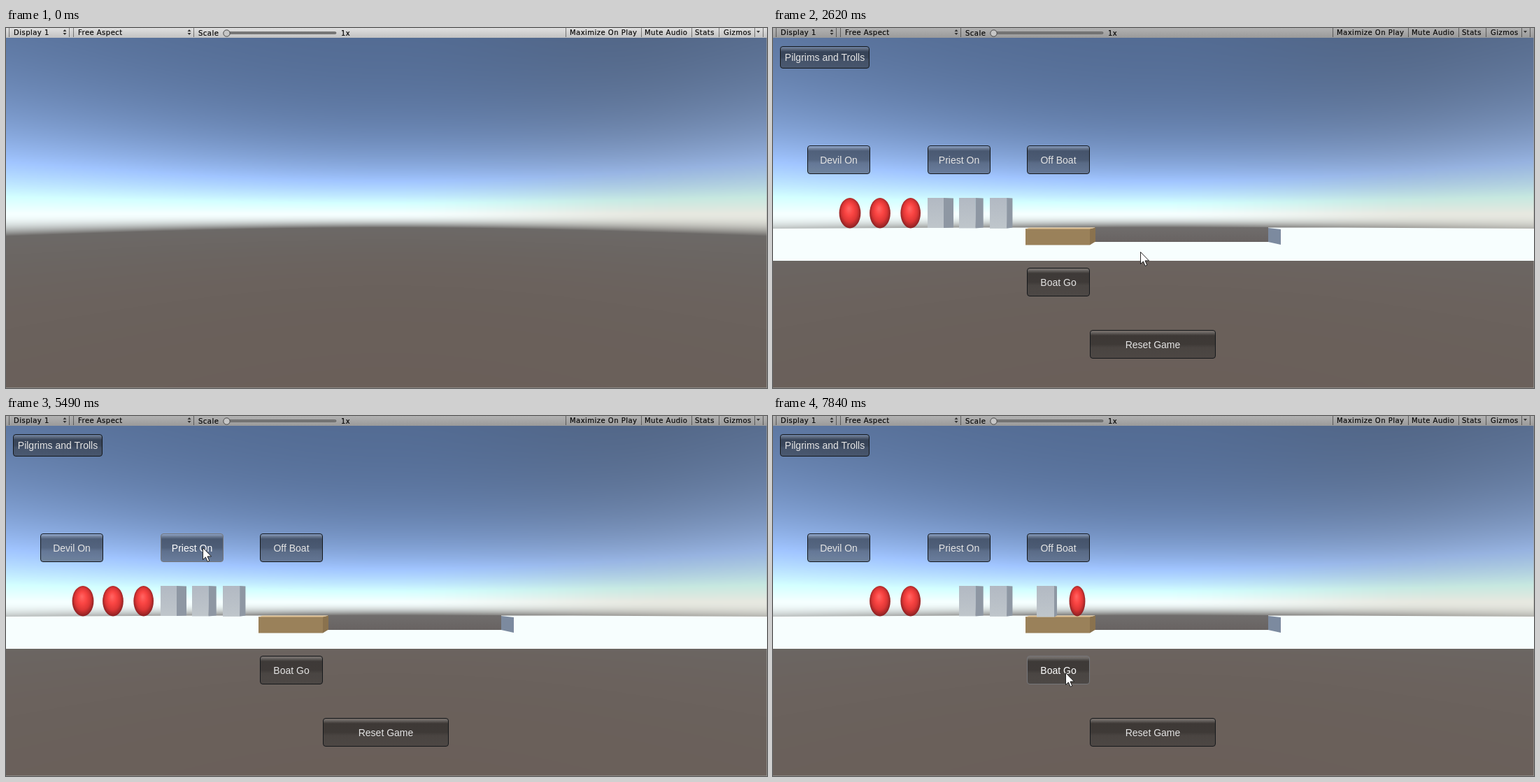
An HTML page with a canvas that plays this animation: 1088 by 515 pixels, repeating every 8000 ms.

```html
<!DOCTYPE html>
<html lang="en">
<head>
<meta charset="utf-8">
<title>River crossing game</title>
<style>
  html, body { margin: 0; width: 100%; height: 100%; overflow: hidden; background: #6a605a; }
  #stage { position: relative; width: 1088px; height: 515px; overflow: hidden; }
  #stage > * { position: absolute; }
  canvas, #bar { left: 0; top: 0; }
  #bar text {
    font: 10px "DejaVu Sans", sans-serif; letter-spacing: .48px;
    fill: #080808; stroke: #080808; stroke-width: .2px;
  }
  .btn {
    box-sizing: border-box; border: 1px solid #15181b; border-radius: 4px;
    display: flex; align-items: center; justify-content: center;
    font: 14px "Liberation Sans", Arial, sans-serif; color: #e4e4e4; white-space: nowrap;
    background: linear-gradient(rgba(255,255,255,.05), rgba(120,120,120,.5) 2px,
      rgba(75,75,75,.5) 4px, rgba(20,20,20,.52) 7px, rgba(22,22,22,.52) 50%,
      rgba(38,38,38,.48) 62%, rgba(42,42,42,.46));
  }
  .btn.hover { border-color: #76777a; color: #fff; }
  #cursor { left: 0; top: 0; overflow: visible; }
</style>
</head>
<body>
<div id="stage">
  <canvas id="view" width="1088" height="515"></canvas>
  <svg id="bar" width="1088" height="15">
    <defs>
      <linearGradient id="light" x2="0" y2="1"><stop stop-color="#e0e0e0"/><stop offset="1" stop-color="#c2c2c2"/></linearGradient>
      <linearGradient id="dark" x2="0" y2="1"><stop stop-color="#b2b2b2"/><stop offset="1" stop-color="#9a9a9a"/></linearGradient>
    </defs>
    <rect id="strip" width="1088" height="14"/>
    <path d="M4.500 0v13m86-13v13m6-13v13m172-13v13m532-13v13m108-13v13m72-13v13m39-13v13m51-13v13m12-13v13" stroke="#000" stroke-opacity=".45"/>
    <path d="M81.500 5l2.500-3 2.500 3zm0 2l2.500 3 2.500-3zM259.500 5l2.500-3 2.500 3zm0 2l2.500 3 2.500-3zM1073 4h5l-2.500 3z" fill="#333"/>
    <rect x="318" y="5.500" width="154" height="3" rx="1.500" fill="#777" stroke="#555" stroke-width=".6"/>
    <circle cx="315.500" cy="7.500" r="4.700" fill="#c6c6c6" stroke="#444"/>
    <text x="11" y="10">Display 1</text>
    <text x="103" y="10">Free Aspect</text>
    <text x="275" y="11">Scale</text>
    <text x="479" y="11">1x</text>
    <text x="806" y="10">Maximize On Play</text>
    <text x="913" y="10">Mute Audio</text>
    <text x="985" y="10">Stats</text>
    <text x="1026" y="10">Gizmos</text>
  </svg>
  <svg id="cursor" width="14" height="22">
    <path d="M.5.5V17.500L4.400 13.900 7.200 20.300 9.800 19.200 7 12.900H12.500Z" fill="#fff" stroke="#111" stroke-width=".9"/>
  </svg>
</div>
<script>
const W = 1088, H = 515, HORIZON = 264.5, FOCAL = 433, LOOP = 8000;
const $ = id => document.getElementById(id);
const ctx = $('view').getContext('2d');
const clamp = v => Math.min(1, Math.max(0, v));
const smooth = k => k * k * (3 - 2 * k);
const mix = (a, b, k) => a + (b - a) * k;

// Sky brightens exponentially towards the horizon, then fades into the ground
const ZENITH = [80, 104, 143], GLOW = [165, 190, 230];
const GROUND = [106, 95, 89], RIM = [2, 10, 14], HAZE = [.06, .09, .12];

function skyColor(x, y, channel) {
  const d = (y - HORIZON) / Math.hypot(1, (x - W / 2) / FOCAL);
  const glow = Math.exp(Math.min(0, d) / 64);
  const haze = HAZE[channel] * smooth(clamp((x - 540) / 420));
  const air = Math.min(255, ZENITH[channel] + GLOW[channel] * glow) * (1 - haze);
  const soil = GROUND[channel] + RIM[channel] * Math.exp(-Math.max(0, d - 20) / 60);
  return mix(air, soil, clamp(d / 20.5) ** 2.2);
}

function paintSky() {
  const cv = document.createElement('canvas');
  cv.width = W; cv.height = H;
  const c = cv.getContext('2d'), img = c.createImageData(W, H);
  for (let i = 0; i < W * H; i++) {
    for (let ch = 0; ch < 3; ch++) img.data[i * 4 + ch] = skyColor(i % W, Math.floor(i / W), ch);
    img.data[i * 4 + 3] = 255;
  }
  c.putImageData(img, 0, 0);
  c.fillStyle = 'rgba(170,170,165,.5)';
  c.fillRect(0, H - 1, W, 1);
  c.fillRect(W - 1, 14, 1, H);
  return cv;
}
const sky = paintSky();

function poly(color, ...p) {
  ctx.fillStyle = color;
  ctx.beginPath();
  for (let i = 0; i < p.length; i += 2) ctx.lineTo(p[i], p[i + 1]);
  ctx.fill();
}

function shade(x, y, w, h, top, bottom) {
  const g = ctx.createLinearGradient(0, y, 0, y + h);
  g.addColorStop(0, top);
  g.addColorStop(1, bottom);
  ctx.fillStyle = g;
  ctx.fillRect(x, y, w, h);
}

function drawRiver() {
  poly('#f7fefe', 0, 287, 280, 285.5, 808, 285.5, W, 287, W, 333, 0, 333);
  shade(460, 285, 248, 21, '#706d6c', '#686362');
  poly('#7c8a9f', 708, 286, 726, 288, 726, 310, 708, 306);
  poly('#9a815a', 361, 287, 453, 287, 453, 310.5, 361, 310.5);
  poly('#8a724e', 453, 287, 461, 285.5, 461, 305.5, 453, 310.5);
  poly('#e0c194', 361, 287.5, 367, 285.5, 461, 285.5, 453, 287.5);
}

function drawDevil(x) {
  ctx.save();
  ctx.translate(x, 264.7);
  ctx.scale(15.4 - (x - 110) * .0122, 21.7);
  const g = ctx.createRadialGradient(-.1, -.3, .05, 0, -.05, 1.05);
  ['#ff6260', '#fb4644', '#dd3635', '#8a2022'].forEach((c, i) => g.addColorStop(i / 3, c));
  ctx.fillStyle = g;
  ctx.beginPath();
  ctx.arc(0, 0, 1, 0, 7);
  ctx.fill();
  ctx.restore();
}

// The side face narrows as the block nears the middle of the view
function drawPriest(x) {
  const k = (x - 221) / 156, mid = x + 23 + 2 * k, end = mid + 14 - 10 * k, base = 286 + 1.5 * k;
  shade(x, 243, mid - x, base - 243, '#b2b9c3', '#bfc6cb');
  poly('#8e97a3', mid, 243, end, 243.5, end, 285.5, mid, base);
}

function addButton(label, x, y, w, h, action) {
  const el = document.createElement('div');
  el.className = 'btn';
  el.textContent = label;
  el.style.cssText = `left:${x}px;top:${y}px;width:${w}px;height:${h}px`;
  $('stage').insertBefore(el, $('cursor'));
  return { el, x, y, w, h, action };
}
const buttons = [
  addButton('Pilgrims and Trolls', 10, 26, 128, 32),
  addButton('Reset Game', 453, 432, 180, 41),
  addButton('Devil On', 49, 168, 90, 41, true),
  addButton('Priest On', 221, 168, 90, 41, true),
  addButton('Off Boat', 363, 168, 90, 41, true),
  addButton('Boat Go', 363, 343, 90, 41, true)
];

const STEP = 78;
const BURSTS = [0, 130, 1610, 2450, 3310, 3460, 3690, 4550, 5410, 5810, 6650, 7520];
function snap(t) {
  const start = BURSTS.filter(b => b <= t).pop();
  return start + Math.floor((t - start + 10) / STEP) * STEP;
}

// Pointer stops: time, x, y
const STOPS = [
  [130, 973, 404], [208, 920, 135],
  [1610, 766, 67], [2000, 492, 195], [2380, 525, 320], [3388, 525, 320],
  [3538, 463, 365], [3768, 435, 339], [4470, 528, 449], [5332, 272, 193],
  [5488, 281, 188], [6050, 281, 190], [6356, 205, 206], [6650, 104, 188],
  [6962, 104, 188], [7274, 470, 390], [7832, 418, 367]
];
function pointer(t) {
  if (t < 130 || (t > 208 && t < 1610)) return null;
  const i = STOPS.findIndex(s => s[0] >= t);
  if (i < 1) return STOPS.at(i).slice(1);
  const [t0, x0, y0] = STOPS[i - 1], [t1, x1, y1] = STOPS[i];
  const k = smooth((t - t0) / (t1 - t0));
  return [Math.round(mix(x0, x1, k)), Math.round(mix(y0, y1, k))];
}

const SPEED = .47, PLAY = 1210, SCENE = 2606, PRIEST_GO = 5805, DEVIL_GO = 6951;
const travel = (t, start, from, to) => Math.min(to, from + Math.max(0, t - start) * SPEED);

function frame(now) {
  const time = now % LOOP, t = snap(time);
  const running = t >= SCENE;
  const priest = travel(t, PRIEST_GO, 221, 377);
  const devil = travel(t, DEVIL_GO, 110, 435);
  const moving = (priest > 221 && priest < 377) || (devil > 110 && devil < 435);
  const pos = pointer(t);

  ctx.drawImage(sky, 0, 0);
  if (running) {
    drawRiver();
    [devil, 153, 196.7].forEach(drawDevil);
    [priest, 266, 310].sort((a, b) => a - b).forEach(drawPriest);
  }

  $('strip').setAttribute('fill', time < PLAY ? 'url(#light)' : 'url(#dark)');
  for (const b of buttons) {
    b.el.style.display = running && !(b.action && moving) ? 'flex' : 'none';
    const over = pos && pos[0] >= b.x && pos[0] < b.x + b.w && pos[1] >= b.y && pos[1] < b.y + b.h;
    b.el.classList.toggle('hover', !!over);
  }
  $('cursor').style.display = pos ? 'block' : 'none';
  if (pos) $('cursor').style.transform = `translate(${pos[0]}px,${pos[1]}px)`;
}

const began = performance.now();
(function tick() {
  frame(performance.now() - began);
  requestAnimationFrame(tick);
})();
</script>
</body>
</html>
```
